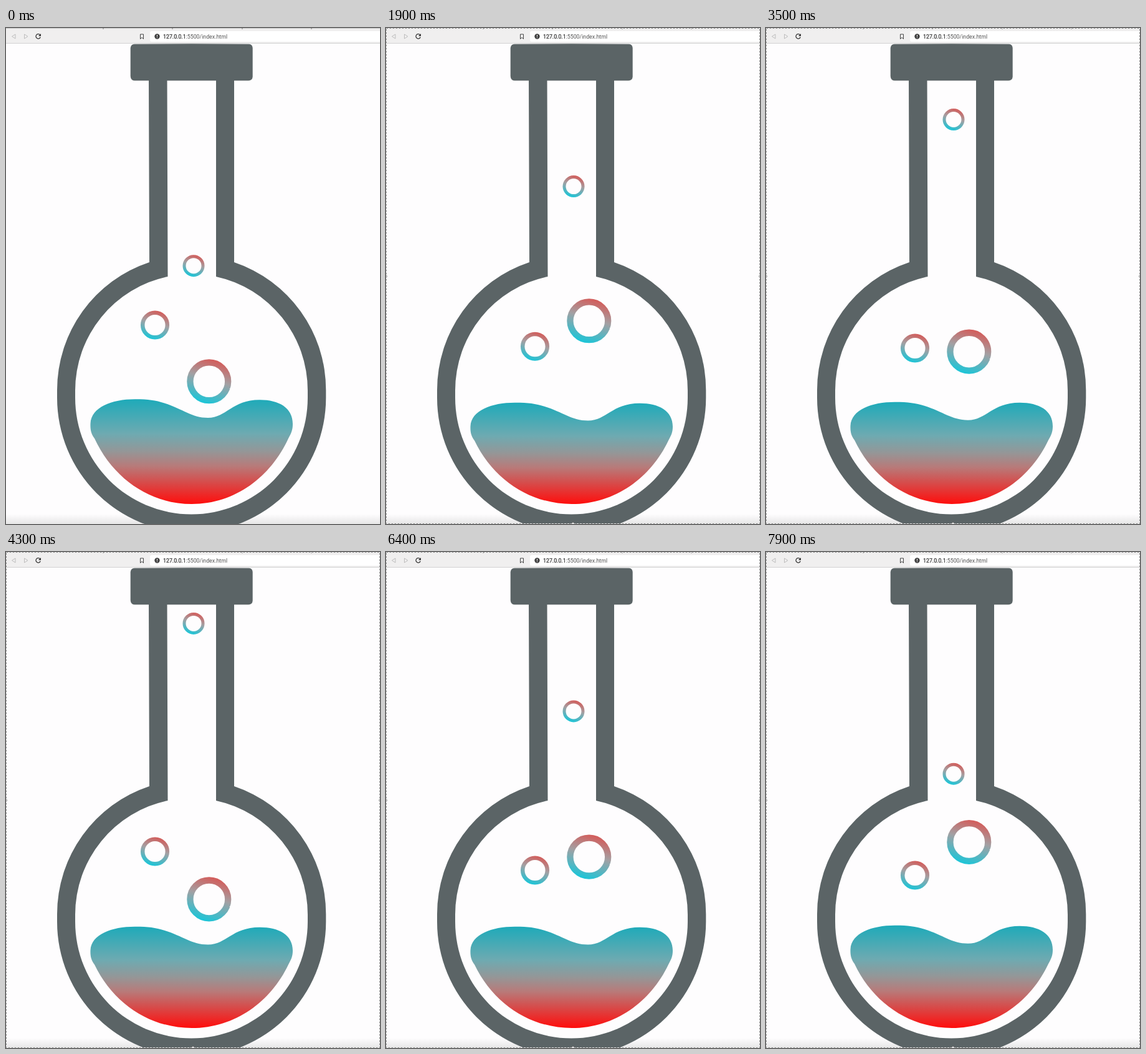
Write an HTML page that moves like this. It is 600 px wide and 794 px high and loops after 8 s.

```html
<!DOCTYPE html>
<html lang="en">
<head>
<meta charset="utf-8">
<title>Flask</title>
<style>
  html, body { margin: 0; width: 100%; height: 100%; overflow: hidden; background: #fefdfe; }
  svg { display: block; width: 100vw; height: 100vh; }
  text { font: 8.8px Roboto, "Liberation Sans", sans-serif; }
</style>
</head>
<body>
<svg viewBox="0 0 600 794" preserveAspectRatio="none">
  <defs>
    <linearGradient id="liquidFill" x2="0" y2="1">
      <stop stop-color="#1eaab9"/>
      <stop offset=".33" stop-color="#6eaab1"/>
      <stop offset=".5" stop-color="#959697"/>
      <stop offset=".64" stop-color="#b87a79"/>
      <stop offset="1" stop-color="#ff0d0c"/>
    </linearGradient>
    <linearGradient id="ringFill" x1=".7" y1="-.15" x2=".3" y2="1.15">
      <stop stop-color="#dd4f4c"/>
      <stop offset=".45" stop-color="#a3a0a3"/>
      <stop offset="1" stop-color="#06cbe0"/>
    </linearGradient>
    <linearGradient id="floorFade" x2="0" y2="1">
      <stop stop-color="#e6e6e6" stop-opacity="0"/>
      <stop offset="1" stop-color="#e6e6e6"/>
    </linearGradient>
  </defs>

  <rect width="600" height="794" fill="#fefdfe"/>
  <rect y="778" width="600" height="16" fill="url(#floorFade)"/>

  <g id="toolbar">
    <rect width="600" height="24" fill="#f0efef"/>
    <rect y="24" width="600" height="1" fill="#d2d2d2"/>
    <rect width="600" height="1" fill="#c4c4c4"/>
    <path d="M156 0v2M267 0v2M379 0v2M490 0v2" stroke="#777"/>
    <rect x="231" y="5" width="380" height="17" rx="3" fill="#fff"/>
    <path d="M15 10v7l-5.500-3.500zM29.500 10v7l5.500-3.500z" fill="none" stroke="#bdbdbd"/>
    <path d="M54.700 11.200A3.700 3.700 0 1 0 55.200 14.500" fill="none" stroke="#333" stroke-width="1.300"/>
    <path d="M56 9v4h-4z" fill="#333"/>
    <path d="M215.500 10h5v7.500l-2.500-2.300l-2.500 2.300z" fill="none" stroke="#444"/>
    <circle cx="242.500" cy="13.500" r="4.200" fill="#444"/>
    <path d="M242.500 11v3M242.500 15v1" stroke="#fff"/>
    <text x="252" y="16.700" fill="#222" stroke="#222" stroke-width=".15">127.0.0.1<tspan fill="#555" stroke="none">:5500/index.html</tspan></text>
  </g>

  <g id="flask" fill="#5b6466">
    <path d="M206 25.700Q298 25 390 25.700Q395.300 26 395.700 32L395.700 78Q395.300 84 389 84.300L206 84.300Q200 84 199.700 77L199.700 32Q200.300 26 206 25.700Z"/>
    <path fill-rule="evenodd" d="M229 82H258.500L259.500 398A186.500 186.500 0 0 0 111 580.500V592A186.500 186.500 0 0 0 484 592V580.500A186.500 186.500 0 0 0 337 398V82H366V375A215.700 215.700 0 0 1 513.300 580V592A215.650 215.650 0 0 1 82 592V580A215.700 215.700 0 0 1 230 375Z"/>
  </g>

  <path id="liquid" fill="url(#liquidFill)" d="M135.500 633C137 607 170 594 208 594.300C228 594.300 240 596 254 600.500C284 610 298 624 324 624C354 624 362 595.500 407 595.300C438 595.300 460 608 460 634C460 643 458 648 453 657C425 718 368 762 298 762C232 762 172 722 142 657C137 650 135 644 135.500 633Z"/>

  <g id="bubbles" fill="none" stroke="url(#ringFill)">
    <g id="small"><circle r="15" stroke-width="5"/></g>
    <g id="medium"><circle r="19.800" stroke-width="6.500"/></g>
    <g id="large">
      <circle r="30.400" stroke-width="10.300"/>
      <path d="M33 12l3-1" stroke="#fefdfe" stroke-width="1.200"/>
    </g>
  </g>

  <g id="selection" display="none">
    <rect x=".5" y=".5" width="599" height="793" fill="none" stroke="#fff"/>
    <rect x=".5" y=".5" width="599" height="793" fill="none" stroke="#8a8a8a" stroke-dasharray="3 2"/>
    <g fill="#fff" stroke="#777">
      <circle cx="300" cy="793.500" r="2"/>
      <circle cx="0" cy="397.500" r="1.500"/>
      <circle cx="600" cy="397.500" r="1.500"/>
    </g>
  </g>
</svg>
<script>
  const LOOP = 8000, STEP = 100;
  const el = id => document.getElementById(id);
  const mod = (a, n) => ((a % n) + n) % n;

  // The CSS "ease" curve: cubic-bezier(.25, .1, .25, 1)
  function ease(x) {
    const bezier = (a, b, u) => 3 * a * u * (1 - u) ** 2 + 3 * b * u * u * (1 - u) + u ** 3;
    let low = 0, high = 1;
    for (let i = 0; i < 24; i++) {
      const mid = (low + high) / 2;
      if (bezier(.25, .25, mid) < x) low = mid; else high = mid;
    }
    return bezier(.1, 1, low);
  }

  // Eases from one height to another and back, once per period
  function bob(t, start, period, from, to) {
    const phase = 2 * mod(t - start, period) / period;
    return phase < 1 ? from + (to - from) * ease(phase)
                     : to + (from - to) * ease(phase - 1);
  }

  function keyed(t, keys) {
    const i = Math.max(1, keys.findIndex(k => k[0] >= t));
    const [t0, v0] = keys[i - 1], [t1, v1] = keys[i];
    return v0 + (v1 - v0) * (t - t0) / (t1 - t0);
  }

  const BOTTOM = 762, REST_TOP = 594.3, SLOSH = 2.4;
  const surface = [[0, 594.3], [.3, 595.3], [.75, 598.1], [1.2, 598.9],
                   [1.6, 599.7], [1.9, 599.7], [SLOSH, 594.3]];

  const place = (id, x, y) => el(id).setAttribute("transform", `translate(${x} ${y.toFixed(2)})`);

  function draw(ms) {
    const t = ms / 1000;
    place("small", 301, 103.7 + 66.9 * Math.abs(t - 4.14));
    place("medium", 239, bob(t, .89, 4.507, 469.5, 523.5));
    place("large", 325.8, bob(t, .15, 5.1, 566, 462));

    const scale = (BOTTOM - keyed(mod(t, SLOSH), surface)) / (BOTTOM - REST_TOP);
    el("liquid").setAttribute("transform", `translate(0 ${BOTTOM}) scale(1 ${scale}) translate(0 ${-BOTTOM})`);
    el("selection").setAttribute("display", ms >= 1500 ? "inline" : "none");
  }

  const begin = performance.now();
  function tick() {
    const ms = mod(performance.now() - begin, LOOP);
    draw(Math.floor(ms / STEP) * STEP);
    requestAnimationFrame(tick);
  }
  tick();
</script>
</body>
</html>
```
